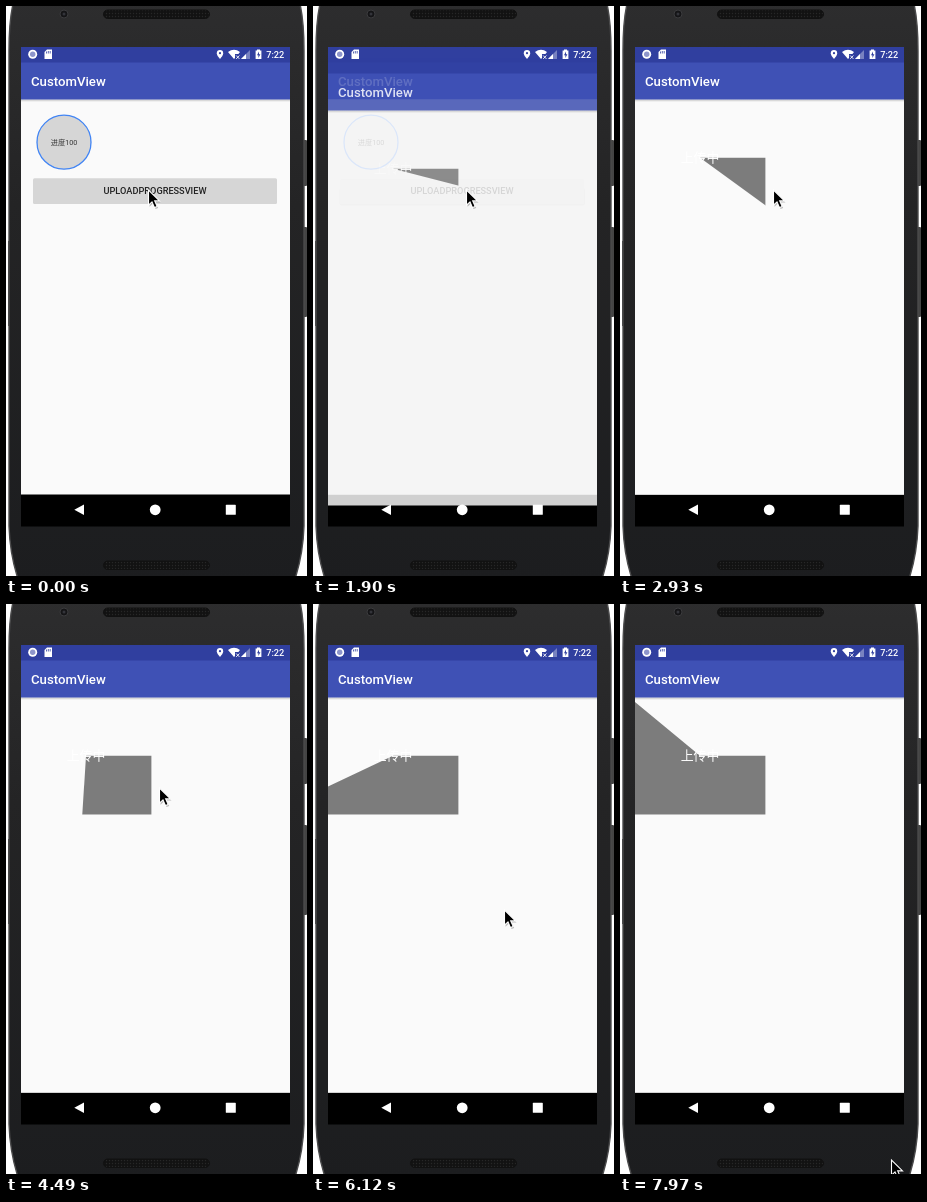
Animation, 301 px wide and 570 px high, one loop 8000 ms. Source, as an HTML page:

```html
<!DOCTYPE html>
<html lang="zh">
<head>
<meta charset="utf-8">
<title>Upload progress</title>
<style>
  html, body { margin: 0; width: 100%; height: 100%; overflow: hidden; background: #fff; }
  svg { display: block; width: 301px; height: 570px; }
  text { font-family: Roboto, "Noto Sans CJK SC", "Noto Sans CJK", sans-serif; }
  .title { font-size: 13.2px; font-weight: 500; fill: #fff; }
  .middle { text-anchor: middle; }

  #press { opacity: 0; animation: press 8s linear infinite; }
  @keyframes press {
    0%, 12.5% { opacity: 0; }
    15.4%, 100% { opacity: .1; }
  }
</style>
</head>
<body>
<svg viewBox="0 0 301 570">
  <defs>
    <linearGradient id="body" x2="0" y2="1">
      <stop offset="0" stop-color="#2d2d2e"/>
      <stop offset=".35" stop-color="#242425"/>
      <stop offset="1" stop-color="#1c1d1f"/>
    </linearGradient>
    <linearGradient id="shade" x2="0" y2="1">
      <stop offset="0" stop-opacity=".22"/>
      <stop offset="1" stop-opacity="0"/>
    </linearGradient>
    <pattern id="mesh" width="3" height="3" patternUnits="userSpaceOnUse">
      <rect width="3" height="3" fill="#121212"/>
      <circle cx="1.5" cy="1.5" r=".7" fill="#272727"/>
    </pattern>
    <clipPath id="screen"><rect x="15" y="41" width="269" height="479.6"/></clipPath>
    <clipPath id="view"><rect x="15" y="94" width="130.4" height="116.6"/></clipPath>
    <g id="window">
      <rect x="15" y="41" width="269" height="447.5" fill="#fafafa"/>
      <rect x="15" y="93.5" width="269" height="2.5" fill="url(#shade)"/>
      <rect x="15" y="56" width="269" height="37.5" fill="#3f51b5"/>
      <rect x="15" y="41" width="269" height="15.5" fill="#303f9f"/>
      <text class="title" x="25" y="79.5">CustomView</text>
    </g>
  </defs>

  <!-- phone -->
  <g fill="#444">
    <rect x="296" y="134" width="5" height="46" rx="1"/>
    <rect x="296" y="221" width="5" height="90" rx="1"/>
    <rect x="2" y="235" width="2" height="85"/>
  </g>
  <path d="M8 -6Q3 12 3 45V520Q4 550 13 576H288Q297 550 298 520V45Q298 12 293 -6Z" fill="url(#body)" stroke="#4a4a4b" stroke-width="1.4"/>
  <circle cx="58" cy="8" r="4" fill="#151517" stroke="#3b3b3d"/>
  <circle cx="58" cy="8" r="1.5" fill="#33343a"/>
  <g fill="url(#mesh)" stroke="#111">
    <rect x="97.5" y="4" width="106" height="8.5" rx="4.2"/>
    <rect x="97.5" y="555" width="106" height="8.5" rx="4.2"/>
  </g>

  <g clip-path="url(#screen)">
    <rect x="15" y="41" width="270" height="480"/>
    <use href="#window"/>
    <rect id="dim" x="15" y="93.5" width="269" height="395" fill="#dcdcdc"/>
    <circle cx="58" cy="136.2" r="27" fill="#d6d6d6" stroke="#4285f4" stroke-width="1.3"/>
    <text class="middle" x="58" y="138.9" font-size="7.2" fill="#333">进度100</text>
    <rect id="press" x="26.5" y="182" width="245.5" height="17.5" rx="2"/>
    <rect x="27" y="172.3" width="244" height="25.8" rx="1.5" fill="#d6d6d6"/>
    <text class="middle" x="149" y="188.3" font-size="9.2" font-weight="500" fill="#212121">UPLOADPROGRESSVIEW</text>

    <g id="next">
      <use href="#window"/>
      <g clip-path="url(#view)">
        <path id="sector" fill-opacity=".5"/>
        <text class="middle" x="80" y="155.7" font-size="12.9" fill="#fff">上传中</text>
      </g>
    </g>

    <!-- status bar -->
    <g fill="#fff">
      <circle cx="26.7" cy="48.2" r="4.5"/>
      <circle cx="26.7" cy="48.2" r="2.7" fill="#8d95cb"/>
      <path d="M41 43.5H46V53H38.5V46Z"/>
      <path d="M40.5 45.5v2M42.3 45v2.5M44.2 45v2.5" stroke="#303f9f" stroke-width=".8"/>
      <path d="M214 53C212 50.5 210.8 49 210.8 47.2A3.2 3.2 0 0 1 217.2 47.2C217.2 49 216 50.5 214 53Z"/>
      <circle cx="214" cy="47.2" r="1.1" fill="#303f9f"/>
      <path d="M222 46Q228 41.5 234 46L232.4 48H229V52L228 53Z"/>
      <path d="M230.2 49.5l3.2 3.4m0-3.4l-3.2 3.4" stroke="#fff" stroke-width=".9"/>
      <path d="M244 44V53H235Z" opacity=".35"/>
      <path d="M240 48V53H235Z"/>
      <path d="M251 43.5h3v1h1.4V53h-5.8V44.5H251Z"/>
      <path d="M253 45.5L251 49.2h1.4V52l2-3.7H253Z" fill="#303f9f"/>
      <text x="260.2" y="51.7" font-size="9.2" font-weight="500">7:22</text>
    </g>
    <!-- navigation bar -->
    <g fill="#fff">
      <path d="M68.3 503.8L78 498.5V509.1Z"/>
      <circle cx="149.2" cy="503.8" r="5.4"/>
      <rect x="219.8" y="498.8" width="10" height="10" rx=".6"/>
    </g>
  </g>

  <g id="cursor">
    <path d="M0 0V15.2L3.5 11.9L6 17.6L8.7 16.4L6.2 10.9H11Z" transform="translate(1 1.5)" opacity=".25"/>
    <path d="M0 0V15.2L3.5 11.9L6 17.6L8.7 16.4L6.2 10.9H11Z" stroke="#fff" stroke-width="1.1"/>
  </g>
</svg>

<script>
  const LOOP = 8000, OPEN = 1900;
  const $ = id => document.getElementById(id);
  const next = $('next'), dim = $('dim'), sector = $('sector'), cursor = $('cursor');

  // key points: time, then values
  const pointer = [[30, 142, 184], [550, 153, 184], [5880, 153, 184],
    [6210, 205, 351], [6720, 250, 459], [7970, 271, 556]];
  const progress = [[OPEN, 4], [2930, 10], [3140, 15], [4490, 26], [5540, 37], [7970, 61]];

  function tween(keys, t) {
    const i = keys.findIndex(k => k[0] > t);
    if (i < 1) return keys.at(i).slice(1);
    const [t0, ...from] = keys[i - 1], [t1, ...to] = keys[i];
    return from.map((v, j) => v + (to[j] - v) * (t - t0) / (t1 - t0));
  }

  function sectorPath(cx, cy, r, degrees) {
    const a = degrees * Math.PI / 180;
    const x = cx + r * Math.cos(a), y = cy + r * Math.sin(a);
    return `M${cx} ${cy}h${r}A${r} ${r} 0 ${+(degrees > 180)} 1 ${x} ${y}Z`;
  }

  function draw(now) {
    const t = now % LOOP, age = t - OPEN;
    const display = age < 0 ? 'none' : '';
    next.style.display = dim.style.display = display;
    next.setAttribute('transform', `translate(0 ${Math.round(11 * Math.exp(-age / 200))})`);
    next.setAttribute('opacity', Math.min(1, .83 + age / 600));

    const percent = Math.floor(tween(progress, t)[0] + .4);
    sector.setAttribute('d', sectorPath(80, 151.8, 200, percent * 3.6));

    const [x, y] = tween(pointer, t).map(Math.round);
    cursor.setAttribute('transform', `translate(${x + .5} ${y})`);
  }

  function loop() {
    draw(performance.now());
    requestAnimationFrame(loop);
  }
  loop();
</script>
</body>
</html>
```
